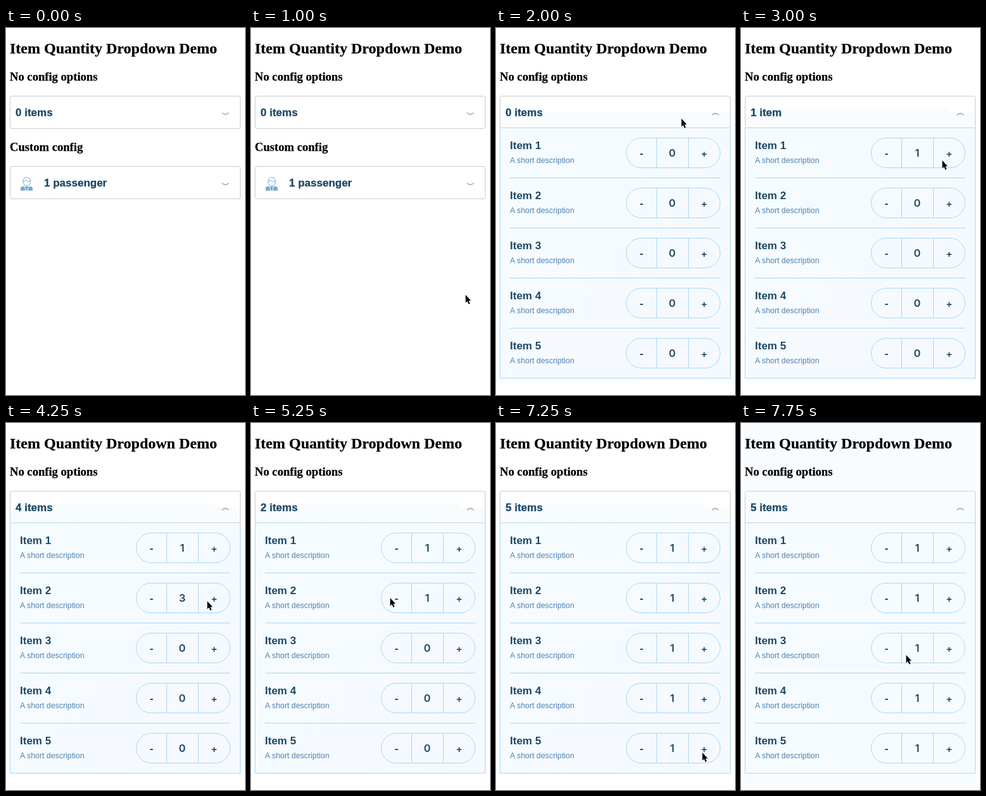
Animation of 377 by 579 pixels, one loop 8 s. Source, as an HTML page:

```html
<!DOCTYPE html>
<html lang="en">
<head>
<meta charset="utf-8">
<title>Item Quantity Dropdown Demo</title>
<style>
  html, body { margin: 0; width: 100%; height: 100%; overflow: hidden; background: #fff; }
  svg { display: block; width: 100%; height: 100%; }
  text { font-family: "Liberation Sans", Arial, Helvetica, sans-serif; white-space: pre; }
  .serif { font-family: "Liberation Serif", Times, serif; font-weight: bold; stroke: #000; stroke-width: .25px; }
  .h2 { font-size: 24px; }
  .h3 { font-size: 18.6px; }
  .label { font-size: 17px; font-weight: bold; fill: #1d4866; }
  .strong { stroke: #1d4866; stroke-width: .3px; }
  .count { font-family: Inter, "Liberation Sans", sans-serif; font-size: 16.5px; font-weight: 600; }
  .plus { font-size: 15px; }
  .desc { font-size: 12.35px; fill: #4f82b0; }
  .mid { text-anchor: middle; }
  .line { fill: none; stroke: #a9d6f7; }
  .box { fill: #fff; stroke: #ccc; }
  .chevron { fill: none; stroke: #a0a0a0; stroke-width: 1.2; stroke-linecap: round; }
</style>
</head>
<body>
<svg viewBox="0 0 377 579" preserveAspectRatio="none">
  <defs>
    <linearGradient id="panelFill" x1="0" y1="0" x2="1" y2="1">
      <stop offset="0" stop-color="#f5fcff"/>
      <stop offset="1" stop-color="#f6f9ff"/>
    </linearGradient>
  </defs>
  <rect id="page" width="377" height="579"/>
  <text class="serif h2" x="6" y="40">Item Quantity Dropdown Demo</text>
  <text class="serif h3" x="6" y="83">No config options</text>

  <rect id="header" class="box" x="6.5" y="107.5" width="363" height="51" rx="2.5"/>
  <g id="tint" fill="#f8fcff">
    <rect x="7" y="133" width="362" height="24"/>
    <rect id="tintTop" x="15" y="127" width="313" height="6"/>
  </g>
  <text id="total" class="label strong" x="15" y="139"></text>
  <path id="chevron" class="chevron"/>

  <g id="custom">
    <text class="serif h3" x="6" y="194">Custom config</text>
    <rect class="box" x="6.5" y="218.5" width="363" height="51" rx="2.5"/>
    <rect x="27" y="235.5" width="11.5" height="13.5" rx="5.7" fill="none" stroke="#7ba6d0"/>
    <path d="M27 242Q30 242 31 240Q34 243 38 242" fill="none" stroke="#7ba6d0"/>
    <path d="M23 256.5V253Q23 250.5 26 250H39Q42 250.5 42 253V256.5Z" fill="#7ba6d0"/>
    <path d="M29.5 250L31 256.500M35.500 250L34 256.500" stroke="#fff"/>
    <text class="label strong" x="60" y="250">1 passenger</text>
    <path class="chevron" d="M341 245Q346 249.500 351 245"/>
  </g>

  <g id="panel">
    <rect id="panelBox" x="6.5" y="157.5" width="363" height="395" stroke="#a9d6f7"/>
    <path d="M6 157.500H370" stroke="#bfd3e2"/>
    <g id="rows"></g>
  </g>

  <path id="cursor" d="M.5 1V13.500L3.200 11L5.300 15.700L7.400 14.800L5.400 10.200H9Z"
        stroke="#fff" paint-order="stroke" stroke-linejoin="round"/>
</svg>
<script>
const $ = id => document.getElementById(id);
const STEP = 250, LOOP = 8000, ITEMS = 5, PITCH = 79;
const OPEN = 8, FIRST_MOVE = 10, TINTED = 31;

// Pointer stops: arrival step, place, steps spent there; each of those steps clicks the item
const stops = [
  { at: 4, x: 338, y: 420, stay: 0 },
  { at: 7, x: 292, y: 142, stay: 2 },
  { at: 11, x: 317, y: 208, stay: 1, item: 0, change: 1 },
  { at: 14, x: 317, y: 280, stay: 3, item: 1, change: 1 },
  { at: 19, x: 219, y: 275, stay: 2, item: 1, change: -1 },
  { at: 24, x: 325, y: 363, stay: 1, item: 2, change: 1 },
  { at: 26, x: 323, y: 447, stay: 1, item: 3, change: 1 },
  { at: 28, x: 325, y: 519, stay: 1, item: 4, change: 1 },
  { at: 31, x: 260, y: 365, stay: 1 }
];

const clamp = (v, lo, hi) => Math.min(Math.max(v, lo), hi);

function pointer(step) {
  const i = stops.findLastIndex(s => step >= s.at);
  if (i < 0) return null;
  const a = stops[i], b = stops[i + 1] || a, leave = a.at + a.stay;
  const k = clamp((step - leave) / (b.at - leave || 1), 0, 1);
  return [a.x + (b.x - a.x) * k, a.y + (b.y - a.y) * k].map(Math.round);
}

function quantities(step) {
  const qty = Array(ITEMS).fill(0);
  for (const { at, stay, item, change } of stops)
    if (change) qty[item] += change * clamp(step - at, 0, stay);
  return qty;
}

const row = i => `<g transform="translate(0 ${i * PITCH})">
  <text class="label" x="22" y="191">Item ${i + 1}</text>
  <text class="desc" x="22" y="213">A short description</text>
  <rect class="line" x="205.5" y="173.5" width="148" height="47" rx="23.5"/>
  <path class="line" d="M253.500 173V221M303.500 173V221"/>
  <text class="label mid" x="229.5" y="203">-</text>
  <text class="label mid count" x="278" y="203"></text>
  <text class="label mid plus" x="328.5" y="203.5">+</text>
  ${i < ITEMS - 1 ? '<path class="line" d="M22 236.500H354"/>' : ''}
</g>`;

$('rows').innerHTML = Array.from({ length: ITEMS }, (_, i) => row(i)).join('');
const counts = document.querySelectorAll('.count');

const show = (id, on) => $(id).setAttribute('display', on ? 'inline' : 'none');

function draw(step) {
  const open = step >= OPEN, tinted = step >= TINTED;
  const qty = quantities(step), sum = qty.reduce((a, b) => a + b);

  counts.forEach((el, i) => { el.textContent = qty[i]; });
  $('total').textContent = `${sum} item${sum === 1 ? '' : 's'}`;
  $('chevron').setAttribute('d', open ? 'M341 137Q346 132.500 351 137' : 'M341 134Q346 138.500 351 134');

  show('custom', !open);
  show('panel', open);
  show('tint', open && !tinted);
  show('tintTop', step >= FIRST_MOVE);

  $('page').style.fill = tinted ? '#f8fcff' : '#fff';
  $('header').style.fill = tinted ? '#f8fcff' : '#fff';
  $('header').style.stroke = tinted ? '#c3d3df' : '#ccc';
  $('panelBox').style.fill = tinted ? '#f6fbff' : 'url(#panelFill)';

  const tip = pointer(step);
  show('cursor', tip);
  if (tip) $('cursor').setAttribute('transform', `translate(${tip})`);
}

const start = performance.now();
let last = -1;
function tick() {
  const step = Math.floor((performance.now() - start) % LOOP / STEP);
  if (step !== last) draw(last = step);
  requestAnimationFrame(tick);
}
tick();
</script>
</body>
</html>
```
